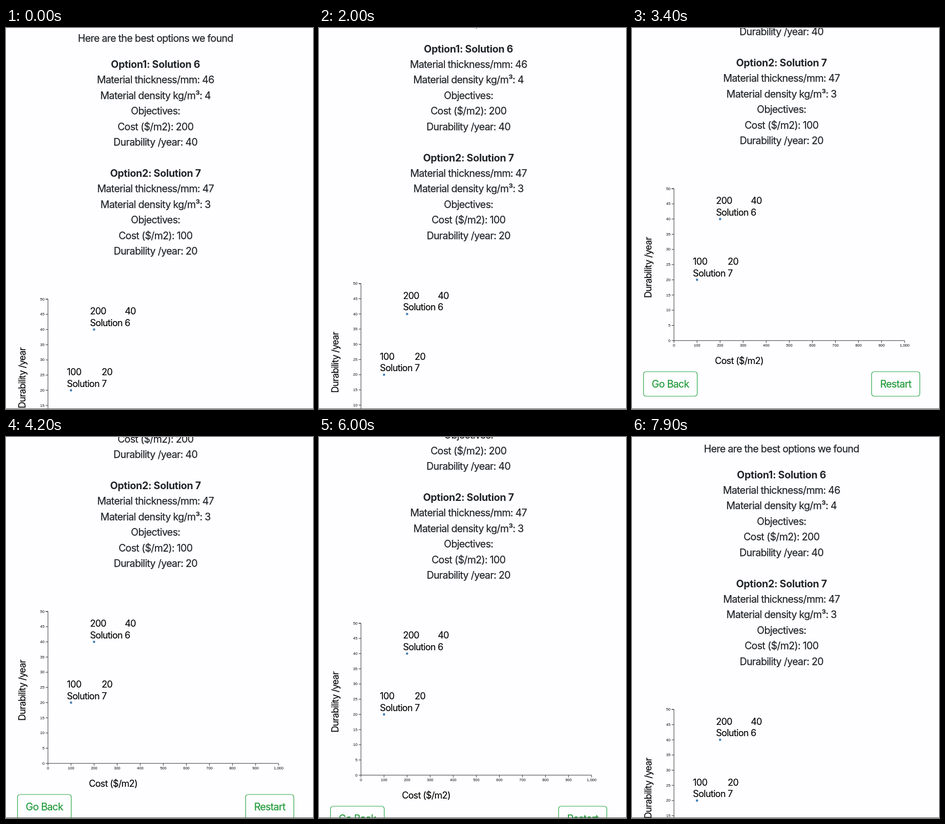
An HTML page for the animation above (8000 ms loop, 600x745 px).

```html
<!DOCTYPE html>
<html lang="en">
<head>
<meta charset="utf-8">
<title>Best options</title>
<style>
  html, body { margin: 0; width: 100%; height: 100%; overflow: hidden; background: #fefdff; }
  svg { display: block; }
  text { font-family: Inter, sans-serif; white-space: pre; }
  .body { font-size: 19.6px; letter-spacing: -.034em; fill: #212529; stroke: #212529; stroke-width: .25; text-anchor: middle; }
  .bold { font-weight: 700; letter-spacing: -.014em; stroke: none; }
  .label { font-size: 18px; letter-spacing: -.038em; stroke: #000; stroke-width: .15; }
  .tick { font: 7.5px "Liberation Sans", sans-serif; }
  .axis { fill: none; stroke: #000; stroke-width: .8; }
  .btn { fill: none; stroke: #28a745; stroke-width: 1.2; }
  .green { fill: #1f9b38; stroke: #1f9b38; }
</style>
</head>
<body>
<svg width="600" height="745" viewBox="0 0 600 745">
  <g id="page"></g>
  <path d="M0 744.5H600" stroke="#555"/>
</svg>
<script>
const page = document.getElementById('page');

function add(tag, attrs, content = '') {
  const el = document.createElementNS('http://www.w3.org/2000/svg', tag);
  for (const k in attrs) el.setAttribute(k, attrs[k]);
  el.textContent = content;
  page.append(el);
}
const text = (cls, x, y, s, more) => add('text', { class: cls, x, y, ...more }, s);

// Option list
const MID = 292.2, LINE = 30.43;
text('body', MID, 27.2, 'Here are the best options we found');
[[6, 46, 4, 200, 40], [7, 47, 3, 100, 20]].forEach(([id, thick, density, cost, years], i) => {
  [`Option${i + 1}: Solution ${id}`, `Material thickness/mm: ${thick}`,
   `Material density kg/m³: ${density}`, 'Objectives:',
   `Cost ($/m2): ${cost}`, `Durability /year: ${years}`]
    .forEach((s, j) => text(j ? 'body' : 'body bold', MID, 78 + LINE * (7 * i + j), s));
});

// Scatter chart
const X0 = 82, Y0 = 827.2, px = v => X0 + v * .4508, py = v => Y0 - v * 5.94;
let axis = `M${X0 - 4.5} ${py(50)}H${X0}V${Y0}H${px(1000)}`;
for (let v = 0; v <= 50; v += 5) {
  axis += `M${X0 - 4.5} ${py(v)}H${X0}`;
  text('tick', X0 - 6.8, py(v) + 2.4, v, { 'text-anchor': 'end' });
}
for (let v = 0; v <= 1000; v += 100) {
  axis += `M${px(v)} ${Y0}v4.5`;
  text('tick', px(v), Y0 + 12.1, v.toLocaleString('en-US'), { 'text-anchor': 'middle' });
}
add('path', { class: 'axis', d: axis });
[[6, 200, 40], [7, 100, 20]].forEach(([id, cost, years]) => {
  const x = px(cost), y = py(years);
  add('circle', { cx: x, cy: y, r: 2.3, fill: 'steelblue' });
  text('label', x - 8, y - 29.2, cost);
  text('label', x + 60, y - 29.2, years);
  text('label', x - 8, y - 6.7, `Solution ${id}`);
});
text('label', 162, 872.6, 'Cost ($/m2)');
text('label', 0, 0, 'Durability /year', { transform: 'translate(37.5 743.8) rotate(-90)' });

// Buttons
[['Go Back', 22.5, 105], ['Restart', 468.3, 94.2]].forEach(([s, x, width]) => {
  add('rect', { class: 'btn', x, y: 888, width, height: 48, rx: 5 });
  text('body green', x + width / 2, 919, s);
});

// Scroll offset over time, joined by a monotone cubic
const keys = [[1000, 0], [1400, 14], [1700, 14], [2000, 30.4], [2700, 140.3], [3500, 218],
  [3600, 218], [4200, 189], [5700, 170], [5800, 170], [6000, 166], [6900, 92.3], [7900, -2.5]];
const secant = i => (keys[i + 1][1] - keys[i][1]) / (keys[i + 1][0] - keys[i][0]);
const slope = keys.map((_, i) => {
  if (!i || i === keys.length - 1) return 0;
  const a = secant(i - 1), b = secant(i);
  return a * b > 0 ? 2 * a * b / (a + b) : 0;
});

function scrollAt(t) {
  if (t <= keys[0][0]) return 0;
  const i = Math.max(0, keys.findIndex(k => k[0] >= t) - 1);
  const [t0, a] = keys[i], [t1, b] = keys[i + 1], h = t1 - t0, u = (t - t0) / h, w = 1 - u;
  return w * w * ((1 + 2 * u) * a + u * h * slope[i]) + u * u * ((1 + 2 * w) * b - w * h * slope[i + 1]);
}

// The picture advances in 100 ms steps
function frame() {
  const t = Math.floor(performance.now() % 8000 / 100) * 100;
  page.setAttribute('transform', `translate(0 ${-scrollAt(t).toFixed(1)})`);
  requestAnimationFrame(frame);
}
frame();
</script>
</body>
</html>
```
